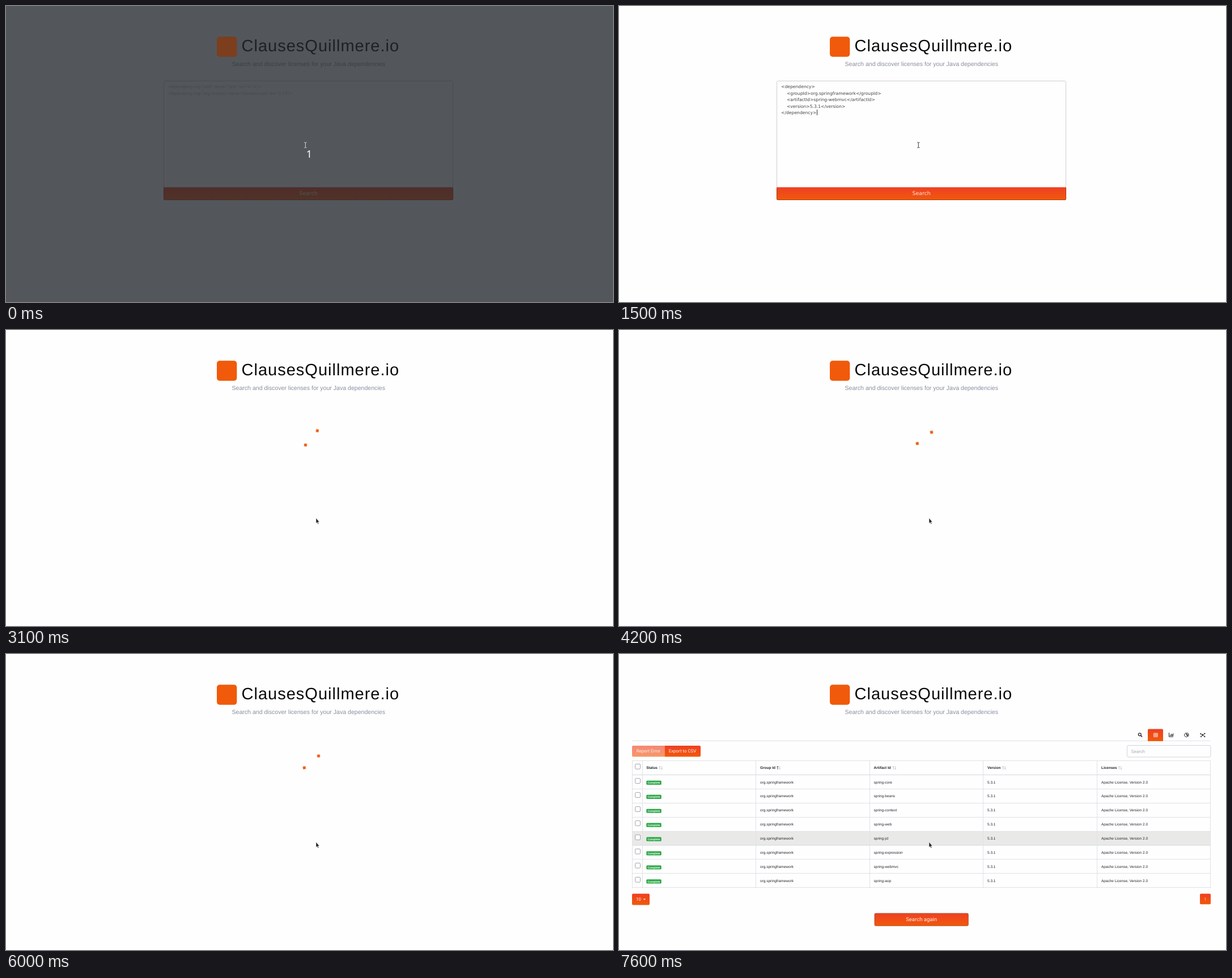
An HTML page that plays this animation: 1071x523 px, repeating every 8000 ms.

```html
<!DOCTYPE html>
<html lang="en">
<head>
<meta charset="utf-8">
<title>License search</title>
<style>
  html, body { margin: 0; width: 100%; height: 100%; overflow: hidden; background: #fefefe; }
  svg { display: block; width: 1071px; height: 523px; }
  text { text-rendering: geometricPrecision; white-space: pre; }
  .sans { font-family: "Liberation Sans", Arial, sans-serif; }
  .rob { font-family: Roboto, sans-serif; }
  .dv { font-family: "DejaVu Sans", sans-serif; }
  .mid { text-anchor: middle; }
  .hint { font-size: 7.55px; font-weight: 300; fill: #a3a6ae; }
  .code { font-size: 7.65px; fill: #444; }
  .cell { font-size: 6.47px; fill: #212529; }
  .head { font-weight: bold; }
  .badge { font-size: 4.85px; font-weight: bold; fill: #fff; }
  .btn { font-size: 7.9px; fill: #fff0ea; }
  .line { fill: none; stroke: #dee2e6; }
  .logo { fill: #f05a0a; }
  .cube {
    fill: #f05a0a;
    transform-box: fill-box;
    transform-origin: center;
    animation: wander 1.81s ease-in-out infinite paused;
    animation-delay: calc((2740 - var(--t)) * 1ms);
  }
  .cube.late { animation-delay: calc((1835 - var(--t)) * 1ms); }
  @keyframes wander {
    0% { transform: translate(0, 0) rotate(0deg) scale(1); }
    25% { transform: translate(25.2px, 0) rotate(-90deg) scale(.5); }
    50% { transform: translate(25.2px, 25.2px) rotate(-180deg) scale(1); }
    75% { transform: translate(0, 25.2px) rotate(-270deg) scale(.5); }
    100% { transform: translate(0, 0) rotate(-360deg) scale(1); }
  }
</style>
</head>
<body>
<svg id="stage" viewBox="0 0 1071 523" style="--t:0">
  <defs>
    <linearGradient id="hot" x1="0" y1="0" x2="0" y2="1">
      <stop offset="0" stop-color="#ee4023"/>
      <stop offset="1" stop-color="#f1590a"/>
    </linearGradient>
    <pattern id="wave" width="3" height="2.4" patternUnits="userSpaceOnUse">
      <path d="M-.5 2 L1 .5 L2.5 2 L4 .5" fill="none" stroke="#e0455a" stroke-width=".7"/>
    </pattern>
  </defs>

  <rect width="1071" height="523" fill="#fefefe"/>
  <rect class="logo" x="372" y="54.3" width="35.3" height="35.5" rx="5"/>
  <text class="sans" x="415.6" y="80.3" font-size="29" letter-spacing="1" fill="#0a0a0a">ClausesQuillmere.io</text>
  <text class="sans mid" x="533.7" y="105.8" font-size="10.59" fill="#8a8fa0">Search and discover licenses for your Java dependencies</text>

  <g id="form">
    <rect x="278.5" y="132.5" width="510" height="190" rx="2" fill="#fefefe" stroke="#cfcfd2"/>
    <path d="M278 320.3H789V340.5a2.5 2.5 0 0 1-2.5 2.5H280.5a2.5 2.5 0 0 1-2.5-2.5Z" fill="url(#hot)"/>
    <path d="M278.4 322V340.5a2.2 2.2 0 0 0 2.2 2H786.4a2.2 2.2 0 0 0 2.2-2V322" fill="none" stroke="#7a3216" stroke-width=".8" opacity=".75"/>
    <text class="dv mid" x="533.7" y="334.4" font-size="9.4" fill="#fde6de">Search</text>
    <g id="hint" class="rob hint">
      <text x="285.8" y="144.8">&lt;dependency org="junit" name="junit" rev="4.13"/&gt;</text>
      <text x="285.8" y="156.6">&lt;dependency org="org.mockito" name="mockito-core" rev="3.3.3"/&gt;</text>
    </g>
    <g id="code" class="dv code">
      <text x="286" y="144.9">&lt;dependency&gt;</text>
      <text x="295.9" y="156.5">&lt;groupId&gt;org.springframework&lt;/groupId&gt;</text>
      <text x="295.9" y="168">&lt;artifactId&gt;spring-webmvc&lt;/artifactId&gt;</text>
      <text x="295.9" y="179.5">&lt;version&gt;5.3.1&lt;/version&gt;</text>
      <text x="286" y="191">&lt;/dependency&gt;</text>
    </g>
    <g id="spell"></g>
    <rect id="caret" width="1" height="10" fill="#333"/>
  </g>

  <g id="spinner">
    <rect class="cube" x="521.8" y="173.5" width="9" height="9"/>
    <rect class="cube late" x="521.8" y="173.5" width="9" height="9"/>
  </g>

  <g id="results">
    <path class="line" d="M23 153.5H1044"/>
    <path d="M933 154V134.5a2 2 0 0 1 2-2h23a2 2 0 0 1 2 2V154Z" fill="url(#hot)"/>
    <g fill="none" stroke="#222" stroke-width="1.2">
      <circle cx="918.8" cy="142.2" r="2.4"/>
      <path d="M920.6 144L923 146.4" stroke-width="1.5"/>
      <path d="M943.4 140h7v6.4h-7zM943.4 142.1h7M943.4 144.2h7M945.7 140v6.4M948.1 140v6.4" stroke="#fde0d6" stroke-width=".8"/>
      <path d="M970.5 139V146.2H978M972.7 145V142.7M974.4 145V140.8M976.1 145V142M977.5 145V140.2" stroke-width="1"/>
      <path d="M1001 139.7a3.4 3.4 0 1 0 2.4 5.8L1001 143Z" stroke-width="1"/>
      <path d="M1002 139.3a3.2 3.2 0 0 1 3.2 3.2H1002ZM1002.4 143.6h2.8a3 3 0 0 1-.9 2Z" stroke-width=".8"/>
      <path d="M1026.3 141L1029.8 143L1033.4 140.6M1029.8 143L1033.3 145.8M1029.8 143L1027 146" stroke-width=".8"/>
    </g>
    <g fill="#222">
      <circle cx="1026.3" cy="141" r="1.1"/><circle cx="1029.8" cy="143" r="1.5"/>
      <circle cx="1033.4" cy="140.6" r="1.1"/><circle cx="1033.3" cy="145.8" r="1.1"/><circle cx="1027" cy="146" r="1"/>
    </g>
    <path d="M80.5 162H25a2 2 0 0 0-2 2v15.5a2 2 0 0 0 2 2H80.5Z" fill="url(#hot)" opacity=".62"/>
    <path d="M80.5 162H142a2 2 0 0 1 2 2v15.5a2 2 0 0 1-2 2H80.5Z" fill="url(#hot)"/>
    <text class="rob btn mid" x="51.8" y="174.2">Report Error</text>
    <text class="rob btn mid" x="112" y="174.2">Export to CSV</text>
    <rect x="896.5" y="161.5" width="147.5" height="20.5" rx="2.5" fill="#fefefe" stroke="#ced4da"/>
    <text class="rob" x="903.8" y="174.6" font-size="7.9" fill="#a5abb2">Search</text>
    <g id="table"></g>
    <rect x="23" y="423.5" width="31" height="20" rx="2" fill="url(#hot)"/>
    <text class="rob btn" x="30.2" y="436.3">10</text>
    <path d="M42.7 432.4h4.4l-2.2 2.3z" fill="#fff0ea"/>
    <rect x="1025" y="423.5" width="19" height="18.8" rx="2" fill="url(#hot)"/>
    <text class="rob mid" x="1034.5" y="435.6" font-size="7.3" fill="#fbd3c2">1</text>
    <rect x="451" y="458.2" width="165.3" height="22" rx="2" fill="url(#hot)" stroke="#9a3c16" stroke-width=".7"/>
    <text class="rob mid" x="533.6" y="471.8" font-size="9.53" fill="#fdeee8">Search again</text>
  </g>

  <g id="veil">
    <rect width="1071" height="523" fill="#23282f" opacity=".78"/>
    <rect class="logo" x="372" y="54.3" width="35.3" height="35.5" rx="5" opacity=".28"/>
    <text x="535" y="268" class="mid" font-family="'Noto Sans', 'Open Sans', sans-serif" font-size="18" fill="#fff">1</text>
  </g>

  <g id="beam" fill="none">
    <path d="M-2.2-4.6H-.6L0-4.1L.6-4.6H2.2M0-4.1V4.1M-2.2 4.6H-.6L0 4.1L.6 4.6H2.2" stroke="#fff" stroke-width="2.2"/>
    <path id="beamInk" d="M-2.2-4.6H-.6L0-4.1L.6-4.6H2.2M0-4.1V4.1M-2.2 4.6H-.6L0 4.1L.6 4.6H2.2" stroke="#333" stroke-width="1"/>
  </g>
  <path id="hand" d="M-.9-.2Q0-1.3 .9-.2V3.2L4.6 4Q5.8 4.4 5.6 5.8L5 9.3H.2L-2.4 5.9Q-2.6 4.6-.9 5.2Z" fill="#fff" stroke="#222" stroke-width=".9" stroke-linejoin="round"/>
  <path id="arrow" d="M547 332.3V341.6L549 339.8L550.4 343L551.8 342.4L550.4 339.3H553Z" fill="#222" stroke="#fff" stroke-width=".5"/>
</svg>
<script>
  const el = id => document.getElementById(id);
  const tag = (name, attrs, body = '') =>
    `<${name} ${Object.entries(attrs).map(([k, v]) => `${k}="${v}"`).join(' ')}>${body}</${name}>`;

  // Spell-check underlines: [x, width, y]
  el('spell').innerHTML = [
    [302.3, 29.5, 157], [353.3, 65, 157], [427.3, 29.5, 157],
    [302.3, 34.7, 168.5], [343.4, 58.6, 168.5], [411, 34.7, 168.5]
  ].map(([x, w, y]) => tag('rect', {
    width: w, height: 2.4, fill: 'url(#wave)', transform: `translate(${x} ${y})`
  })).join('');

  const edges = [23.5, 41.5, 241.5, 442.5, 642.5, 843.5, 1043.5];
  const textX = [48.2, 249, 449.6, 650, 851];
  const heads = [['Status', 70.5], ['Group Id', 278.5], ['Artifact Id', 482.7], ['Version', 676.3], ['Licenses', 881]];
  const names = ['core', 'beans', 'context', 'web', 'jcl', 'expression', 'webmvc', 'aop'];
  const pitch = 24.93, top0 = 214.3;
  const cell = (x, y, s, extra = '') => tag('text', { class: 'sans cell ' + extra, x, y }, s);
  const box = y => tag('rect', { x: 28.7, y, width: 8.8, height: 8.8, rx: 1.5, fill: '#fff', stroke: '#8f8f96', 'stroke-width': .8 });
  const sortMark = (x, d, dark) => tag('path', {
    d, transform: `translate(${x} 201)`, fill: 'none', 'stroke-width': .8,
    stroke: dark ? '#333' : '#b9bcc1'
  });

  function buildTable() {
    let out = tag('rect', { x: 23, y: top0 + 4 * pitch, width: 1021, height: pitch, fill: '#e9e9e8' });
    for (let i = 0; i <= names.length; i++) {
      const y = Math.floor(top0 + i * pitch) - .5;
      out += tag('path', { class: 'line', d: `M23 ${y}H1044`, 'stroke-width': i ? 1 : 1.4 });
    }
    out += tag('path', { class: 'line', d: 'M23 188.5H1044' + edges.map(x => `M${x} 188.5V414`).join('') });
    out += box(194.4);
    heads.forEach(([s, x], i) => {
      out += cell(textX[i], 203.3, s, 'head');
      out += sortMark(x, 'M1.4 3V-2.6M0-1.2L1.4-2.8L2.8-1.2', i === 1);
      out += sortMark(x, 'M4.9-2.8V2.8M3.5 1.4L4.9 3L6.3 1.4', false);
    });
    names.forEach((name, i) => {
      const y = top0 + i * pitch;
      out += box(y + 5.5);
      out += tag('rect', { x: 48.3, y: y + 9.5, width: 26.4, height: 7.2, rx: 1.5, fill: '#28a745' });
      out += tag('text', { class: 'sans badge mid', x: 61.5, y: y + 14.8 }, 'Complete');
      ['org.springframework', 'spring-' + name, '5.3.1', 'Apache License, Version 2.0']
        .forEach((s, c) => out += cell(textX[c + 1], y + 14.2, s));
    });
    el('table').innerHTML = out;
  }
  buildTable();

  const show = (id, on) => el(id).style.display = on ? '' : 'none';
  const place = (id, x, y) => el(id).setAttribute('transform', `translate(${x} ${y})`);

  function render(t) {
    const form = t < 2800, pasted = t >= 1500;
    show('veil', t < 200);
    show('form', form);
    show('hint', !pasted);
    show('code', pasted);
    show('spell', t >= 1600);
    show('caret', t >= 800 && t < 2000);
    place('caret', pasted ? 349 : 286, pasted ? 183 : 137);

    show('spinner', !form && t < 7600);
    el('stage').style.setProperty('--t', Math.min(t, 7400));
    show('results', t >= 7600);

    const p = Math.min(1, Math.max(0, (t - 1900) / 600));
    const k = p * p * (3 - 2 * p);
    const x = 528.3 + 19.2 * k, y = 245.7 + 86.3 * k;
    show('beam', form && y < 320);
    show('hand', form && y >= 320);
    show('arrow', !form);
    place('beam', x, y);
    place('hand', x, y);
    el('beam').firstElementChild.setAttribute('stroke', t < 200 ? '#44484e' : '#fff');
    el('beamInk').setAttribute('stroke', t < 200 ? '#e8e8ea' : '#333');
  }

  // The screen refreshes ten times a second
  function tick() {
    render(Math.floor(performance.now() % 8000 / 100) * 100);
    requestAnimationFrame(tick);
  }
  tick();
</script>
</body>
</html>
```
